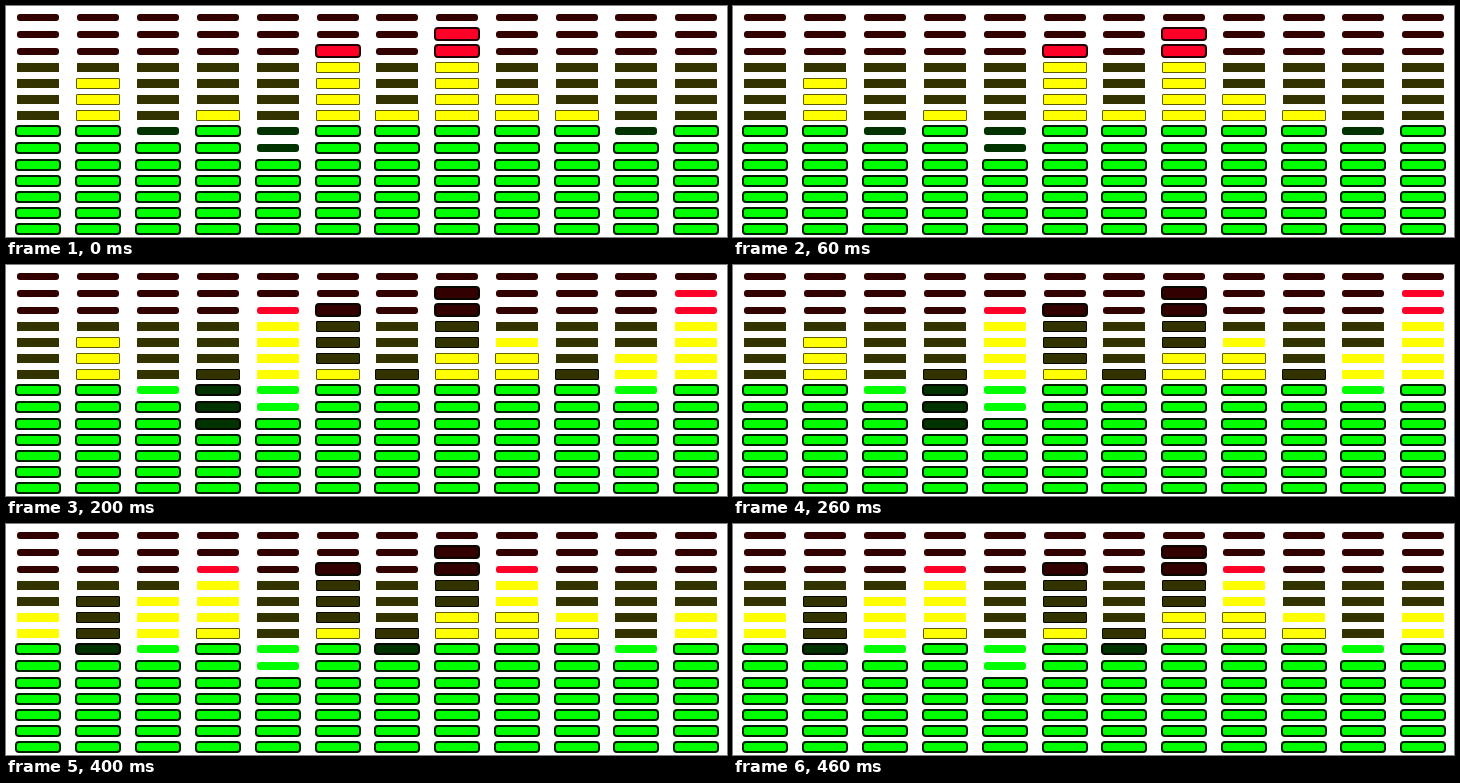
These frames come from a looping animation (721 by 231 pixels, 500 ms). An HTML page:

```html
<!DOCTYPE html>
<html lang="en">
<head>
<meta charset="utf-8">
<title>Level meter</title>
<style>
html, body { margin: 0; width: 100%; height: 100%; overflow: hidden; background: #fff; }
svg { display: block; width: 721px; height: 231px; }
</style>
</head>
<body>
<svg id="meter" viewBox="0 0 721 231"></svg>
<script>
const NS = 'http://www.w3.org/2000/svg';
const STEP = 100;
const ROWS = 14;

// Height of each bar, in lit cells, at the key poses
const start = [7, 10, 6, 8, 5, 12, 8, 13, 9, 8, 6, 7];
const rest = [9, 6, 10, 12, 7, 8, 6, 9, 12, 9, 7, 9];
const surge = [7, 10, 7, 4, 12, 8, 7, 9, 10, 7, 9, 13];
const dip = [4, 7, 12, 9, 10, 5, 11, 5, 13, 10, 7, 9];
const poses = [start, rest, surge, dip, rest];

const green = { on: '#00ff00', off: '#003300', edge: '#002200', h: 8, r: 3, frame: { w: 46, h: 12, line: 2 } };
const yellow = { on: '#ffff00', off: '#333300', edge: '#625c00', h: 9, r: 0.5, frame: { w: 44, h: 11, line: 1 } };
const red = { on: '#ff0029', off: '#330000', edge: '#220000', h: 7, r: 3, frame: { w: 46, h: 14, line: 2 } };
const kindOf = row => row < 7 ? green : row < 11 ? yellow : red;

// The pitch is 60 by 16, with whole-pixel corrections
const colX = col => 32 + 60 * col - Math.max(0, Math.floor((col - 2) / 4));
const rowY = row => {
  const k = row % 7;
  return 223 - 114 * Math.floor(row / 7) - 16 * k - Math.max(0, k - 4);
};

const svg = document.getElementById('meter');
const cells = [];

// Cells lit in the first pose are larger and keep their outline
function addCell(col, row) {
  const kind = kindOf(row);
  const framed = row < start[col];
  const { w, h, line } = framed ? kind.frame : { w: 42, h: kind.h, line: 0 };
  const el = document.createElementNS(NS, 'rect');
  const attrs = {
    x: colX(col) - Math.floor(w / 2) + line / 2,
    y: rowY(row) - Math.floor(h / 2) + line / 2,
    width: w - line, height: h - line, rx: kind.r, 'stroke-width': line
  };
  for (const name in attrs) el.setAttribute(name, attrs[name]);
  svg.append(el);
  cells.push({ el, col, row, kind, framed });
}

for (let col = 0; col < start.length; col++)
  for (let row = 0; row < ROWS; row++) addCell(col, row);

function draw(time) {
  const levels = poses[Math.floor(time / STEP) % poses.length];
  for (const { el, col, row, kind, framed } of cells) {
    const lit = row < levels[col];
    el.setAttribute('fill', lit ? kind.on : kind.off);
    el.setAttribute('stroke', !framed ? 'none' : lit ? kind.edge : '#080800');
  }
}

const began = performance.now();
function tick() {
  draw(performance.now() - began);
  requestAnimationFrame(tick);
}
draw(0);
requestAnimationFrame(tick);
</script>
</body>
</html>
```
